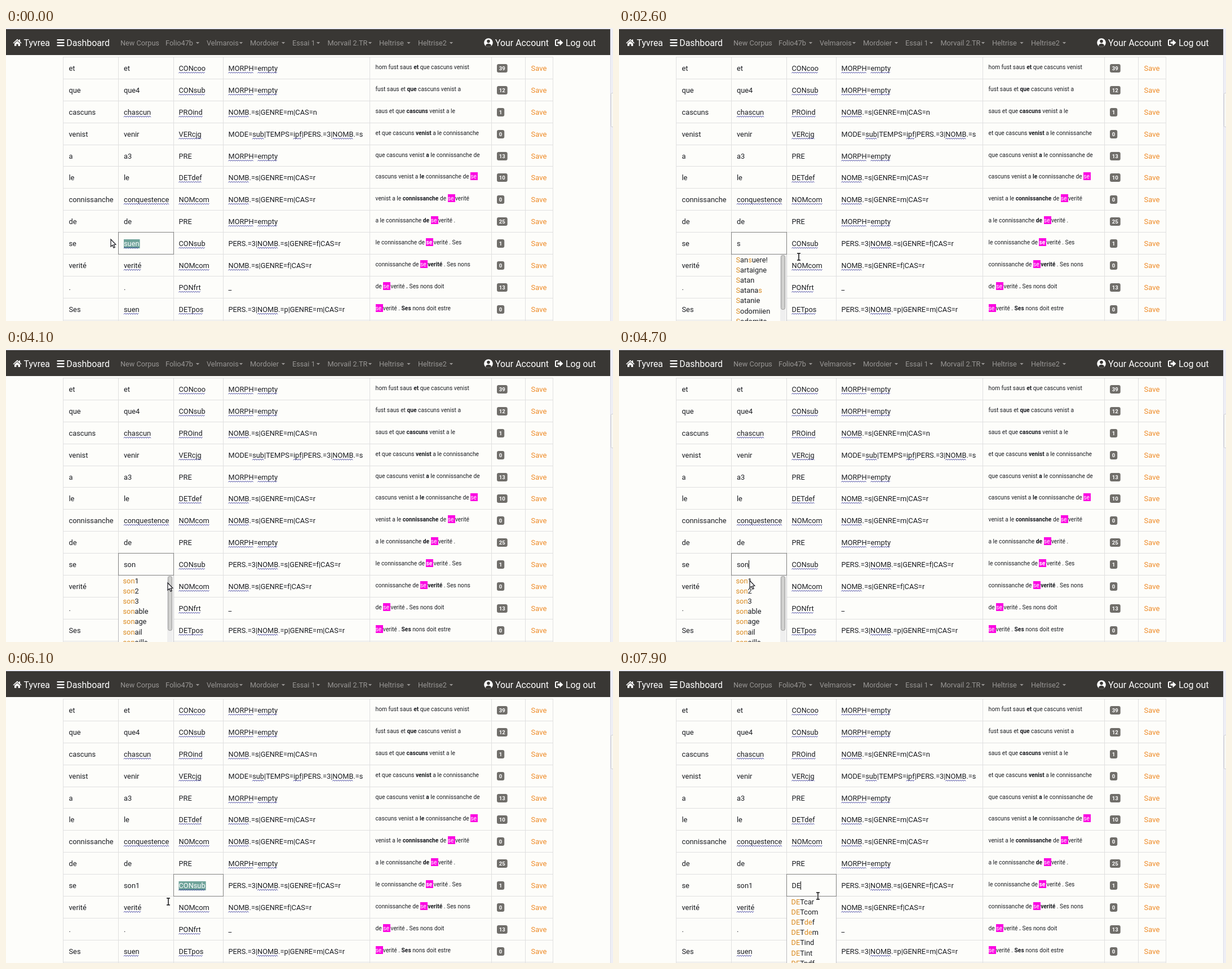
Animation, 1077 px wide and 520 px high, one loop 8000 ms. Source, as an HTML page with a canvas:

```html
<!DOCTYPE html>
<html lang="en">
<head>
<meta charset="utf-8">
<title>Token editor</title>
<style>
html, body { margin: 0; width: 100%; height: 100%; overflow: hidden; background: #fdfdfa; }
canvas { display: block; width: 1077px; height: 520px; }
</style>
</head>
<body>
<canvas id="stage" width="1077" height="520"></canvas>
<script>
const ctx = document.getElementById('stage').getContext('2d');
const W = 1077, H = 520, LOOP = 8000;
const FONT = 'Roboto, sans-serif';
const INK = '#1b1d22', LINE = '#e0e0e0', NAV = '#393734', PAPER = '#fdfdfa';
const ORANGE = '#ee8a26', MATCH = '#d98a20', WAVE = '#34349a';
const COLS = [101, 199, 297, 385, 645, 861, 921, 970];
const EDIT = 8;

// form, lemma, tag, morphology, context, count.
// In contexts *x* is bold, [x] is marked, <x> is marked and bold.
const ROWS = [
  ['et', 'et', 'CONcoo', 'MORPH=empty', 'hom fust saus *et* que cascuns venist', 39],
  ['que', 'que4', 'CONsub', 'MORPH=empty', 'fust saus et *que* cascuns venist a', 12],
  ['cascuns', 'chascun', 'PROind', 'NOMB.=s|GENRE=m|CAS=n', 'saus et que *cascuns* venist a le', 1],
  ['venist', 'venir', 'VERcjg', 'MODE=sub|TEMPS=ipf|PERS.=3|NOMB.=s', 'et que cascuns *venist* a le connissanche', 0],
  ['a', 'a3', 'PRE', 'MORPH=empty', 'que cascuns venist *a* le connissanche de', 13],
  ['le', 'le', 'DETdef', 'NOMB.=s|GENRE=m|CAS=r', 'cascuns venist a *le* connissanche de [se ]', 10],
  ['connissanche', 'conquestence', 'NOMcom', 'NOMB.=s|GENRE=m|CAS=r', 'venist a le *connissanche* de [se ]verité', 0],
  ['de', 'de', 'PRE', 'MORPH=empty', 'a le connissanche *de* [se ]verité .', 25],
  ['se', 'suen', 'CONsub', 'PERS.=3|NOMB.=s|GENRE=f|CAS=r', 'le connissanche de <se >verité . Ses', 1],
  ['verité', 'verité', 'NOMcom', 'NOMB.=s|GENRE=f|CAS=r', 'connissanche de [se ]*verité* . Ses nons', 0],
  ['.', '.', 'PONfrt', '_', 'de [se ]verité *.* Ses nons doit', 13],
  ['Ses', 'suen', 'DETpos', 'PERS.=3|NOMB.=p|GENRE=m|CAS=r', '[se ]verité . *Ses* nons doit estre', 0]
];
const MISSPELT = /chascun|conquestence|suen|verité|[A-Z]{3}[a-z]{3}|MORPH|empty|NOMB|sub|ipf/g;

// label, x, caret x
const LINKS = [
  ['New Corpus', 203, 0], ['Folio47b', 283, 340], ['Velmarois', 356, 417],
  ['Mordoier', 433, 492], ['Essai 1', 508, 554], ['Morvail 2.TR', 570.5, 646],
  ['Heltrise', 662, 714.5], ['Heltrise2', 731, 790]
];

const S_LIST = ['Sansuere!', 'Sartaigne', 'Satan', 'Satanas', 'Satanie', 'Sodomiien', 'Sodomite'];
const SO_LIST = ['Sodomiien', 'Sodomite', 'soatume', 'sobre', 'sobrier', 'soc', 'soef'];
const SON_LIST = ['son1', 'son2', 'son3', 'sonable', 'sonage', 'sonail', 'sonaille'];
const DET_LIST = ['DETcar', 'DETcom', 'DETdef', 'DETdem', 'DETind', 'DETint', 'DETndf'];

// Editing steps: start time, focused column, its text, suggestions, mode
const STEPS = [
  { at: 0, col: 1, text: 'suen', mode: 'select' },
  { at: 2100, col: 1, text: 's', list: S_LIST },
  { at: 2900, col: 1, text: 'so', list: SO_LIST },
  { at: 3300, col: 1, text: 'son', list: SON_LIST },
  { at: 4900, col: 1, text: 'son1', mode: 'home' },
  { at: 6000, col: 2, text: 'CONsub', mode: 'select' },
  { at: 7500, col: 2, text: 'D', list: DET_LIST },
  { at: 7700, col: 2, text: 'DE', list: DET_LIST }
];

// Pointer path: time, x, y
const PATH = [
  [0, 186, 375], [300, 186, 375], [900, 322, 408], [1200, 322, 408], [1500, 320, 407],
  [1800, 319, 406], [3400, 319, 406], [4000, 287, 415], [4200, 287, 415], [4700, 232, 411],
  [4900, 232, 411], [5300, 288, 412], [6400, 288, 411], [7000, 298, 397], [7400, 300, 397],
  [7900, 353, 401]
];

function rect(x, y, w, h, color) {
  ctx.fillStyle = color;
  ctx.fillRect(x, y, w, h);
}

function measure(s, size = 12.8, weight = 400) {
  ctx.font = `${weight} ${size}px ${FONT}`;
  return ctx.measureText(s).width;
}

function text(s, x, y, size = 12.8, color = INK, weight = 400) {
  const w = measure(s, size, weight);
  ctx.fillStyle = color;
  ctx.fillText(s, x, y);
  return w;
}

function poly(points, color) {
  ctx.beginPath();
  points.forEach(([x, y]) => ctx.lineTo(x, y));
  ctx.closePath();
  ctx.fillStyle = color;
  ctx.fill();
}

function roundBox(x, y, w, h, r, fill, stroke) {
  ctx.beginPath();
  ctx.roundRect(x, y, w, h, r);
  ctx.fillStyle = fill;
  ctx.fill();
  if (!stroke) return;
  ctx.strokeStyle = stroke;
  ctx.lineWidth = 1;
  ctx.stroke();
}

const lineY = i => Math.round(50.9 + 38.9 * i);
const baseY = i => Math.round(76.1 + 38.87 * i);

function wave(x, y, w) {
  ctx.beginPath();
  for (let d = 0; d <= w; d += 2) ctx.lineTo(x + d, y + (d / 2 % 2 ? 0.2 : 2.2));
  ctx.strokeStyle = WAVE;
  ctx.lineWidth = 1;
  ctx.stroke();
}

function checked(s, x, y) {
  text(s, x, y);
  for (const m of s.matchAll(MISSPELT)) {
    wave(x + measure(s.slice(0, m.index)), y + 2, measure(m[0]));
  }
}

function context(s, x, y) {
  for (const part of s.split(/(\*.*?\*|\[.*?\]|<.*?>)/)) {
    if (!part) continue;
    const kind = '*[<'.includes(part[0]) ? part[0] : '';
    const word = kind ? part.slice(1, -1) : part;
    const weight = kind === '*' || kind === '<' ? 700 : 400;
    const marked = kind === '[' || kind === '<';
    if (marked) rect(Math.round(x), y - 11, Math.round(measure(word, 10.24, weight)), 14, '#fb06e2');
    x += text(word, x, y, 10.24, marked ? '#fff' : INK, weight);
  }
}

function badge(n, y) {
  const w = measure(n, 9.6, 700);
  roundBox(871, y - 12, w + 7.7, 15, 3.2, '#706e6a');
  text(n, 874.8, y - 1, 9.6, '#fff', 700);
}

function icons() {
  const white = '#fff';
  // house
  poly([[12.5, 26.5], [20, 19.5], [23, 22.3], [23, 20.5], [25, 20.5], [25, 24], [27.5, 26.5],
    [26.5, 27.5], [20, 21.8], [13.5, 27.5]], white);
  poly([[15, 27.5], [20, 23], [25, 27.5], [25, 32], [21.6, 32], [21.6, 28.5], [18.4, 28.5],
    [18.4, 32], [15, 32]], white);
  // menu bars
  for (let i = 0; i < 3; i++) roundBox(90.5, 20 + i * 5, 13, 2.2, 0.6, white);
  // account
  ctx.save();
  ctx.beginPath();
  ctx.arc(856, 26, 7.8, 0, 7);
  ctx.fillStyle = white;
  ctx.fill();
  ctx.clip();
  ctx.fillStyle = NAV;
  ctx.beginPath();
  ctx.arc(856, 23.6, 2.8, 0, 7);
  ctx.fill();
  ctx.beginPath();
  ctx.ellipse(856, 31, 4.9, 3.2, 0, 0, 7);
  ctx.fill();
  ctx.restore();
  // log out
  ctx.strokeStyle = white;
  ctx.lineWidth = 2;
  ctx.beginPath();
  ctx.moveTo(980, 21);
  ctx.lineTo(976.5, 21);
  ctx.quadraticCurveTo(975, 21, 975, 22.5);
  ctx.lineTo(975, 29.5);
  ctx.quadraticCurveTo(975, 31, 976.5, 31);
  ctx.lineTo(980, 31);
  ctx.stroke();
  poly([[978.5, 24.2], [982.5, 24.2], [982.5, 20.5], [988.5, 26], [982.5, 31.5], [982.5, 27.8],
    [978.5, 27.8]], white);
}

function navbar() {
  rect(0, 0, W, 2, '#f1f1f8');
  rect(0, 2, 1072, 46, NAV);
  icons();
  text('Tyvrea', 31.5, 32, 15.9, '#fff');
  text('Dashboard', 107.2, 32, 15.9, '#fff');
  text('Your Account', 868, 32, 15.9, '#fff');
  text('Log out', 993, 32, 15.9, '#fff');
  for (const [label, x, caret] of LINKS) {
    text(label, x, 31, 12.7, '#989694');
    if (caret) poly([[caret - 3.2, 25], [caret + 3.2, 25], [caret, 28.3]], '#989694');
  }
}

function pageScroll() {
  rect(1072, 2, 5, H - 2, '#eeeef5');
  rect(1072, 2, 1, H - 2, '#dcdce9');
  roundBox(1073.5, 115.5, 6, 60, 2, '#f7f7f4', '#cfcfd2');
}

function table(step) {
  for (let i = 0; i <= 12; i++) rect(101, lineY(i), 870, 1, LINE);
  for (const x of COLS) rect(x, 51, 1, H - 51, LINE);
  ROWS.forEach(([form, lemma, tag, morph, words, count], i) => {
    const y = baseY(i);
    const edited = i === EDIT ? step.col : 0;
    text(form, 111.5, y);
    if (edited !== 1) checked(edited ? 'son1' : lemma, 209, y);
    if (edited !== 2) checked(tag, 306.5, y);
    checked(morph, 394.5, y);
    context(words, 655.5, y - 3);
    badge(String(count), y);
    text('Save', 931.5, y, 13, ORANGE);
  });
}

function editor(step, t) {
  const left = COLS[step.col], right = COLS[step.col + 1];
  const x = step.col === 1 ? 209 : 306.5, y = baseY(EDIT);
  const top = lineY(EDIT), bottom = lineY(EDIT + 1);
  ctx.setLineDash([1, 1]);
  ctx.strokeStyle = '#222';
  ctx.lineWidth = 1;
  ctx.strokeRect(left + 0.5, top + 0.5, right - left, bottom - top);
  ctx.setLineDash([]);
  const w = measure(step.text);
  if (step.mode === 'select') {
    rect(x, y - 12, w + 1, 16, '#6fa39a');
    text(step.text, x, y, 12.8, '#fff');
    wave(x, y + 2, w);
    return;
  }
  text(step.text, x, y);
  const lit = Math.floor((t - step.at) / 500) % 2 === 0;
  if (lit) rect(Math.round(step.mode === 'home' ? x : x + w), y - 12, 1, 15, '#111');
}

function suggestions(step) {
  if (!step.list) return;
  const left = COLS[step.col] + 1, w = COLS[step.col + 1] - left, top = lineY(EDIT + 1) + 1;
  rect(left, top, w, H - top, PAPER);
  rect(left - 1, top, 1, H - top, '#b9b9bd');
  rect(left + w, top, 1, H - top, '#c4c4c8');
  const typed = new RegExp(`(${step.text})`, 'i');
  step.list.forEach((item, i) => {
    let x = left + 7.5;
    for (const part of item.split(typed)) {
      const hit = part.toLowerCase() === step.text.toLowerCase();
      x += text(part, x, Math.round(415.6 + 18.2 * i), 12.8, hit ? MATCH : INK);
    }
  });
  if (step.col === 1) {
    rect(286, top, 10, H - top, '#efefef');
    roundBox(287.5, 403.5, 7, 96, 3, '#d0d0ce', '#979797');
  }
}

function pointerAt(t) {
  const i = PATH.findIndex(p => p[0] > t);
  if (i < 0) return PATH[PATH.length - 1].slice(1);
  const [t0, x0, y0] = PATH[i - 1], [t1, x1, y1] = PATH[i];
  const k = (t - t0) / (t1 - t0), e = k * k * (3 - 2 * k);
  return [x0 + (x1 - x0) * e, y0 + (y1 - y0) * e];
}

function arrow(x, y) {
  const shape = [[0, 0], [0, 13], [3, 10.3], [5, 15.2], [7.2, 14.2], [5.2, 9.5], [8.8, 9.3]];
  poly(shape.map(([a, b]) => [x + a, y + b]), '#fff');
  ctx.strokeStyle = '#16161c';
  ctx.lineWidth = 1.2;
  ctx.stroke();
}

function beam(x, y) {
  ctx.beginPath();
  for (const s of [-1, 1]) {
    ctx.moveTo(x - 3, y + 6 * s);
    ctx.lineTo(x + 3, y + 6 * s);
  }
  ctx.moveTo(x, y - 6);
  ctx.lineTo(x, y + 6);
  for (const [color, width] of [['#fff', 3.4], ['#111', 1.5]]) {
    ctx.strokeStyle = color;
    ctx.lineWidth = width;
    ctx.stroke();
  }
}

function pointer(step, t) {
  const [x, y] = pointerAt(t).map(Math.round);
  const overList = step.list && step.col === 1 && x < 297 && y > 401;
  if (x < 199 || overList) arrow(x, y);
  else beam(x, y);
}

function draw(now) {
  const t = Math.floor(now % LOOP / 100) * 100;
  const step = STEPS.filter(s => s.at <= t).pop();
  rect(0, 0, W, H, PAPER);
  table(step);
  editor(step, t);
  suggestions(step);
  navbar();
  pageScroll();
  pointer(step, t);
}

const start = performance.now();
function tick() {
  draw(performance.now() - start);
  requestAnimationFrame(tick);
}
tick();
</script>
</body>
</html>
```
